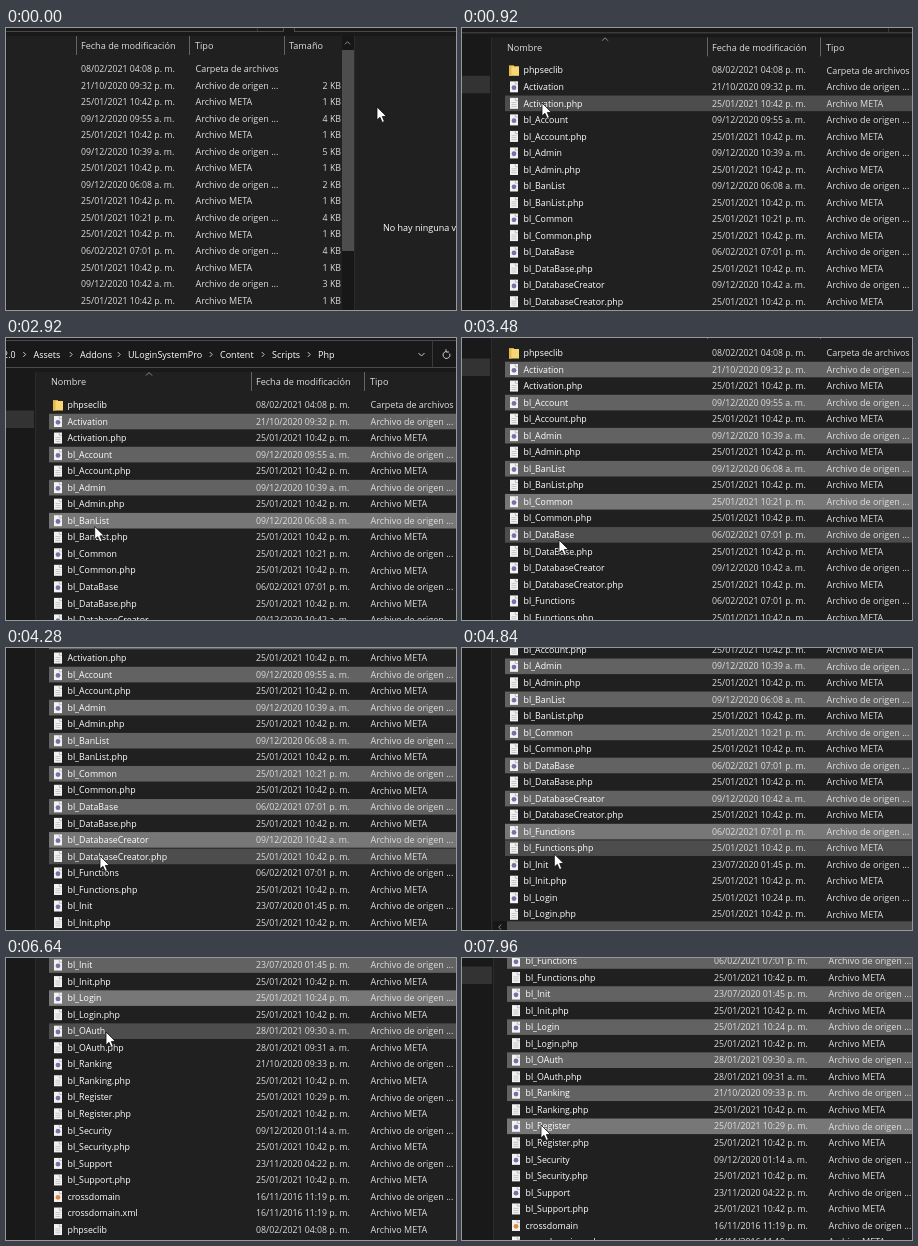
Recreate the animation shown at these times as an HTML page with a canvas. Size 450 px wide and 282 px high, loop 8 s.

```html
<!DOCTYPE html>
<html lang="es">
<head>
<meta charset="utf-8">
<title>Explorador de archivos</title>
<style>
html, body { margin: 0; width: 100%; height: 100%; overflow: hidden; background: #202020; }
canvas { display: block; width: 450px; height: 282px; }
</style>
</head>
<body>
<canvas id="stage"></canvas>
<script>
const W = 450, H = 282, LOOP = 8000;
const PITCH = 16.53, FIRST = 67, LIST_TOP = 54, LIST_END = 404.6;
const SANS = '"Open Sans", "Noto Sans", sans-serif';

const canvas = document.getElementById('stage');
const ratio = window.devicePixelRatio || 1;
canvas.width = W * ratio;
canvas.height = H * ratio;
const ctx = canvas.getContext('2d');

// Each script is followed by its META companion.
const META_DATE = '25/01/2021 10:42 p. m.';
const scripts = `Activation|21/10/2020 09:32 p. m.|2
bl_Account|09/12/2020 09:55 a. m.|4
bl_Admin|09/12/2020 10:39 a. m.|5
bl_BanList|09/12/2020 06:08 a. m.|2
bl_Common|25/01/2021 10:21 p. m.|4
bl_DataBase|06/02/2021 07:01 p. m.|4
bl_DatabaseCreator|09/12/2020 10:42 a. m.|3
bl_Functions|06/02/2021 07:01 p. m.|4
bl_Init|23/07/2020 01:45 p. m.|2
bl_Login|25/01/2021 10:24 p. m.|3
bl_OAuth|28/01/2021 09:30 a. m.|3
bl_Ranking|21/10/2020 09:33 p. m.|2
bl_Register|25/01/2021 10:29 p. m.|4
bl_Security|09/12/2020 01:14 a. m.|2
bl_Support|23/11/2020 04:22 p. m.|3`.split('\n').map(s => s.split('|'));
const FOLDER_DATE = '08/02/2021 04:08 p. m.', XML_DATE = '16/11/2016 11:19 p. m.';
const SOURCE = 'Archivo de origen ...', META = 'Archivo META';
const rows = [{ name: 'phpseclib', date: FOLDER_DATE, type: 'Carpeta de archivos', icon: 'folder' }];
for (const [name, date, kb] of scripts) {
  const metaDate = name === 'bl_OAuth' ? '28/01/2021 09:31 a. m.' : META_DATE;
  rows.push({ name, date, type: SOURCE, kb, icon: '#7472a8' });
  rows.push({ name: name + '.php', date: metaDate, type: META, kb: 1 });
}
rows.push({ name: 'crossdomain', date: XML_DATE, type: SOURCE, kb: 1, icon: '#e08a3c' });
rows.push({ name: 'crossdomain.xml', date: XML_DATE, type: META, kb: 1 });
rows.push({ name: 'phpseclib', date: FOLDER_DATE, type: META, kb: 1 });

// Keys are [time, value...], joined by straight segments.
const pointer = [
  [60, 546, 105], [480, 255, 104], [900, 80, 101], [1320, 80, 75], [1640, 80, 84],
  [1840, 80, 113], [2080, 81, 115], [2320, 84, 147], [2480, 84, 149], [2760, 87, 181],
  [2880, 88, 183], [3120, 92, 215], [3260, 94, 217], [3480, 97, 254], [3620, 97, 254],
  [3900, 95, 281], [4260, 94, 298], [4360, 94, 298], [4520, 93, 314], [5000, 92, 349],
  [5300, 91, 387], [6000, 91, 387], [6280, 95, 258], [6640, 100, 167], [6680, 100, 167],
  [6880, 98, 138], [7180, 86, 165], [7460, 77, 196], [7600, 77, 198], [7800, 77, 231]
];
const cameraX = [[480, 175], [900, 0], [7180, 0], [7460, -2]];
const cameraY = [
  [900, 26], [1320, 0], [3000, 0], [3120, 13], [3260, 15], [3480, 52], [3620, 52], [4260, 90],
  [4360, 90], [5000, 145], [5300, 183.6], [6280, 183.6], [6640, 93], [6680, 93], [6880, 64]
];
// Moments at which rows 1, 3, 5, ... are clicked.
const clicks = [1580, 2040, 2440, 2840, 3220, 3600, 3980, 4600, 4960, 5520, 7160, 7520, 7900];

function along(keys, t) {
  let i = 1;
  while (i < keys.length - 1 && keys[i][0] < t) i++;
  const [t0, ...a] = keys[i - 1], [t1, ...b] = keys[i];
  const u = Math.max(0, Math.min(1, (t - t0) / (t1 - t0)));
  return a.map((v, k) => v + (b[k] - v) * u);
}

// Five wheel notches, three rows each.
function scrollAt(t) {
  const notches = Math.max(0, Math.min(5, Math.floor((t - 5640) / 70) + 1));
  return notches * 3 * PITCH;
}

function rect(x, y, w, h, color) {
  ctx.fillStyle = color;
  ctx.fillRect(x, y, w, h);
}

function text(str, x, y, color = '#fff', size = 8.8, align = 'left') {
  ctx.font = size + 'px ' + SANS;
  ctx.textAlign = align;
  ctx.fillStyle = color;
  ctx.fillText(str, x, y + size * 0.36);
}

function line(points, color, width = 1) {
  ctx.beginPath();
  points.forEach(([x, y]) => ctx.lineTo(x, y));
  ctx.strokeStyle = color;
  ctx.lineWidth = width;
  ctx.stroke();
}

// Chevron pointing along (dx, dy).
function chevron(x, y, dx, dy, color, s = 2.4) {
  const tip = [x + dx * s / 2, y + dy * s / 2];
  const wing = k => [tip[0] - dx * s + k * dy * s, tip[1] - dy * s + k * dx * s];
  line([wing(1), tip, wing(-1)], color);
}

function dot(x, y, rx, ry, color) {
  ctx.beginPath();
  ctx.ellipse(x, y, rx, ry, 0, 0, Math.PI * 2);
  ctx.fillStyle = color;
  ctx.fill();
}

function fileIcon(y, icon) {
  if (icon === 'folder') {
    rect(47, y - 5, 5, 3, '#d9a93c');
    rect(47, y - 4, 10, 9.5, '#f7d774');
    rect(47, y - 4, 2.5, 9.5, '#e6b94c');
    return;
  }
  rect(48, y - 5.5, 8, 11, '#f2f2f2');
  line([[53.3, y - 5.5], [53.3, y - 2.8], [56, y - 2.8]], '#a8a8a8', 0.7);
  if (icon) dot(52, y + 0.8, 2.4, 2.4, icon);
  else for (let k = -1; k < 4; k += 2) rect(49.5, y + k, 5, 0.7, '#b4b4b4');
}

function drawRows(t, px, py) {
  const scroll = scrollAt(t);
  const focus = clicks.filter(c => c <= t).length * 2 - 1;
  const inList = px > 43 && px < 509 && py > LIST_TOP && py < LIST_END;
  const hover = inList ? Math.round((py + scroll - FIRST) / PITCH) : -1;

  ctx.save();
  ctx.beginPath();
  ctx.rect(31, LIST_TOP, 480, LIST_END - LIST_TOP);
  ctx.clip();
  rows.forEach((row, i) => {
    const y = FIRST + i * PITCH - scroll;
    if (y < LIST_TOP - 9 || y > LIST_END + 9) return;
    const selected = i % 2 === 1 && i <= focus;
    const fill = selected ? (i === focus ? '#777' : '#626262') : i === hover ? '#4d4d4d' : null;
    if (fill) rect(43, y - 7.8, 466, 15.6, fill);
    fileIcon(y, row.icon);
    text(row.name, 61.5, y);
    text(row.date, 250, y, '#dedede', 8.75);
    text(row.type, 364.5, y, '#dedede', 9);
    if (row.kb) text(row.kb + ' KB', 510, y, '#dedede', 8.8, 'right');
  });
  ctx.restore();
}

function drawAddressBar() {
  rect(-10, -10, 700, 44, '#191919');
  ctx.strokeStyle = '#4a4a4a';
  ctx.lineWidth = 1;
  ctx.strokeRect(-40.5, 2.5, 493, 27);
  ctx.strokeRect(463.5, 2.5, 200, 27);
  text('2.0', 9.5, 16.5, '#fff', 8.8, 'right');
  const crumbs = [['Assets', 27.5], ['Addons', 74], ['ULoginSystemPro', 122],
    ['Content', 214], ['Scripts', 266], ['Php', 312]];
  for (const [name, x] of crumbs) {
    chevron(x - 9, 16.5, 1, 0, '#c8c8c8');
    text(name, x, 16.5, '#fff', 9);
  }
  chevron(415.5, 16.5, 0, 1, '#c8c8c8', 3);
  rect(426, 3, 1, 26, '#3a3a3a');
  ctx.beginPath();
  ctx.arc(440.5, 17, 3.5, -0.4, Math.PI * 1.5);
  ctx.strokeStyle = '#c8c8c8';
  ctx.stroke();
  line([[440, 11.2], [440, 14], [443, 14]], '#c8c8c8');
}

function drawHeader() {
  chevron(143, 36, 0, -1, '#8a8a8a', 3);
  const heads = [['Nombre', 45], ['Fecha de modificación', 250], ['Tipo', 364], ['Tamaño', 458]];
  for (const [name, x] of heads) text(name, x, 44, '#dedede', 9.1);
  for (const x of [245, 358, 453]) rect(x, 34, 1, 19, '#636363');
}

function drawScrollbars(t) {
  rect(511, 34, 12, 382, '#171717');
  chevron(516.5, 41, 0, -1, '#8a8a8a', 2.6);
  rect(511, 48 + scrollAt(t) * 0.56, 12, 201, '#4d4d4d');
  rect(523, 34, 1, 382, '#2b2b2b');
  rect(31, LIST_END, 480, 12, '#171717');
  chevron(38, 410.5, -1, 0, '#8a8a8a', 2.6);
  rect(45, LIST_END, 440, 12, '#4d4d4d');
}

function drawStatus() {
  const y = 426.8;
  rect(-10, 416.5, 700, 19, '#333');
  text('11 elementos seleccionados', 51.5, y, '#fff', 8.8, 'right');
  text('23.6 KB', 56, y);
  text('Estado:', 102.5, y, '#dedede');
  text('Compartido', 148.5, y);
  for (const x of [94, 205]) rect(x, 422, 1, 9, '#dedede');
  for (const [x, color] of [[137, '#6aa84f'], [143, '#5b9bd5']]) {
    dot(x, y - 2.5, 2, 2.2, '#e2b98f');
    dot(x, y + 2.5, 3, 2.8, color);
  }
}

function drawBackWindow() {
  const shade = ctx.createLinearGradient(0, 435, 0, 466);
  shade.addColorStop(0, '#777');
  shade.addColorStop(1, '#c4c4c4');
  rect(-10, 435.5, 700, 60, shade);
  rect(-10, 435.5, 180, 60, '#f0f0f0');
  rect(-10, 435.5, 180, 3, '#b8b8b8');
  rect(-10, 450.5, 180, 1, '#a0a0a0');
  rect(-10, 451.5, 165, 44, '#fff');
  rect(170, 435.5, 1.2, 60, '#6a6a6a');
  text('Direction', 56, 461, '#111', 8.7);
  text('Remote file', 103, 461, '#111', 8.7);
  for (const x of [51, 98, 154]) rect(x, 453, 1, 30, '#d8d8d8');
  chevron(162, 459, 0, -1, '#444', 3);
}

function drawPointer(x, y) {
  ctx.beginPath();
  [[0, 0], [0, 13], [3, 10.3], [5.2, 15.4], [7.4, 14.4], [5.3, 9.5], [9.3, 9.3]]
    .forEach(([dx, dy]) => ctx.lineTo(x + dx, y + dy));
  ctx.closePath();
  ctx.fillStyle = '#fff';
  ctx.fill();
  ctx.strokeStyle = '#111';
  ctx.lineWidth = 0.8;
  ctx.stroke();
}

function draw(t) {
  const [px, py] = along(pointer, t);
  const [cx] = along(cameraX, t), [cy] = along(cameraY, t);
  ctx.setTransform(ratio, 0, 0, ratio, 0, 0);
  rect(0, 0, W, H, '#202020');
  ctx.translate(-cx, -cy);
  rect(-10, 34, 39, 383, '#191919');
  rect(-10, 72.5, 38, 17.5, '#333');
  rect(29, 34, 1, 383, '#2b2b2b');
  drawRows(t, px, py);
  drawAddressBar();
  drawHeader();
  drawScrollbars(t);
  text('No hay ninguna vista previa disponible.', 552, 226, '#fff', 9);
  drawStatus();
  drawBackWindow();
  drawPointer(px, py);
}

const start = performance.now();
function tick() {
  draw((performance.now() - start) % LOOP);
  requestAnimationFrame(tick);
}
tick();
</script>
</body>
</html>
```
